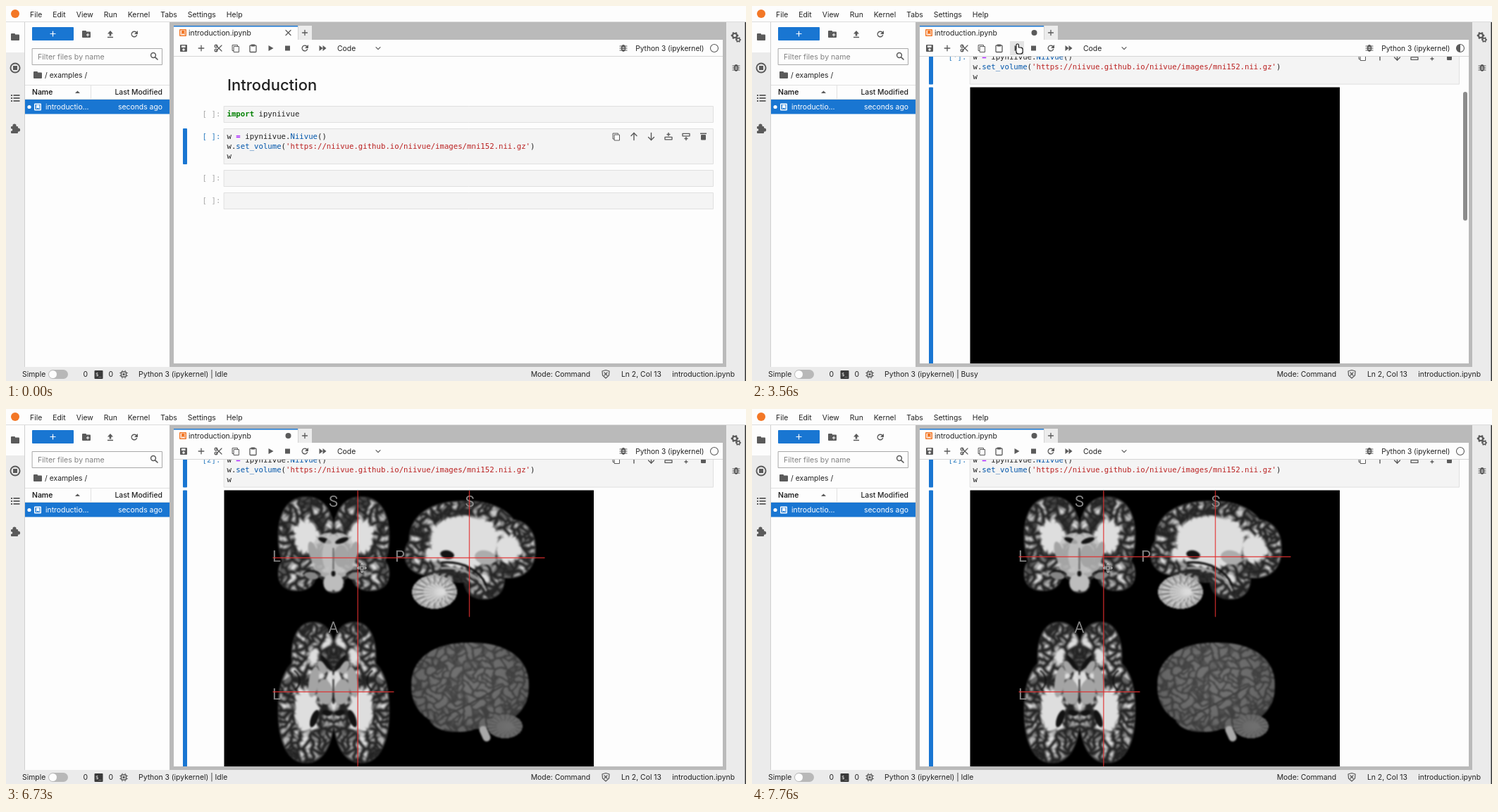
Recreate the animation shown at these times as an HTML page with a canvas. Size 1050 px wide and 533 px high, loop 8000 ms.

```html
<!DOCTYPE html>
<html lang="en">
<head>
<meta charset="utf-8">
<title>Notebook demo</title>
<style>
html, body { margin: 0; width: 100%; height: 100%; overflow: hidden; background: #fdfdfd; }
canvas { display: block; width: 1050px; height: 533px; }
</style>
</head>
<body>
<canvas id="stage" width="1050" height="533"></canvas>
<script>
const W = 1050, H = 533, LOOP = 8000, MID = 464.5;
const g = document.getElementById('stage').getContext('2d');
let c = g; // context the helpers draw on

const UI = '10.4px Inter, sans-serif', MONO = '10.68px "DejaVu Sans Mono", monospace';
const WHITE = '#fdfdfd', INK = '#222', ICON = '#5a5a5a', BLUE = '#1976d2', ORANGE = '#f37726';
const PANEL = '#ebebeb', RULE = '#e0e0e0', DARK = '#121212', GRAY = '#a4a4a4';

// ---- drawing helpers ----
function box(x, y, w, h, col, r = 0) {
  c.fillStyle = col; c.beginPath(); c.roundRect(x, y, w, h, r); c.fill();
}
function frame(x, y, w, h, col = ICON, r = 0, lw = 1) {
  c.strokeStyle = col; c.lineWidth = lw; c.beginPath(); c.roundRect(x, y, w, h, r); c.stroke();
}
function oval(x, y, rx, ry, col, rot = 0) {
  c.fillStyle = col; c.beginPath(); c.ellipse(x, y, rx, ry, rot, 0, 7); c.fill();
}
function arc(x, y, rx, ry, col, w, from = 0, to = 2 * Math.PI) {
  c.strokeStyle = col; c.lineWidth = w; c.lineCap = 'round';
  c.beginPath(); c.ellipse(x, y, rx, ry, 0, from, to); c.stroke();
}
const disc = (x, y, r, col) => oval(x, y, r, r, col);
const ring = (x, y, r, w = 1.2, from, to) => arc(x, y, r, r, ICON, w, from, to);
function trace(flat) {
  c.beginPath();
  for (let i = 0; i < flat.length; i += 2) c.lineTo(flat[i], flat[i + 1]);
}
function lines(col, w, ...polys) {
  c.strokeStyle = col; c.lineWidth = w; c.lineCap = c.lineJoin = 'round';
  for (const p of polys) { trace(p); c.stroke(); }
}
function shape(col, flat) { c.fillStyle = col; trace(flat); c.fill(); }
function text(s, x, y, col = INK, font = UI, align = 'left') {
  c.font = font; c.textAlign = align; c.fillStyle = col;
  c.fillText(s, x, y + 3.9);
  return c.measureText(s).width;
}
function code(x, y, ...parts) {
  for (const [s, col = INK, weight = ''] of parts) x += text(s, x, y, col, weight + MONO);
}

// ---- maths helpers ----
const clamp = v => Math.max(0, Math.min(1, v));
const ease = k => k * k * (3 - 2 * k);
const between = (t, a, b) => t >= a && t < b;
function rng(s) { return () => (s = s * 16807 % 2147483647) / 2147483647; }
function along(keys, t) {
  const i = keys.findIndex(k => t < k[0]);
  if (i < 0) return keys[keys.length - 1][1];
  if (!i) return keys[0][1];
  const [t0, a] = keys[i - 1], [t1, b] = keys[i];
  return a + (b - a) * (t - t0) / (t1 - t0);
}

// ---- brain tissue: unions of rounded lobes [x, y, rx, ry], creased by cell borders ----
function depth([cx, cy, rx, ry], x, y) {
  const q = (Math.abs((x - cx) / rx) ** 2.3 + Math.abs((y - cy) / ry) ** 2.3) ** (1 / 2.3);
  return (1 - q) * Math.min(rx, ry);
}
function deepest(lobes, x, y) {
  return lobes.reduce((a, b) => depth(b, x, y) > depth(a, x, y) ? b : a);
}
function bounds(lobes) {
  const lo = k => Math.min(...lobes.map(l => l[k] - l[k + 2])), hi = k => Math.max(...lobes.map(l => l[k] + l[k + 2]));
  return [lo(0), lo(1), hi(0), hi(1)].map(Math.round);
}
function gyri([x0, y0, x1, y1], pitch, seed, aim) {
  const rnd = rng(seed), list = [];
  for (let y = y0; y < y1 + pitch; y += pitch) for (let x = x0; x < x1 + pitch; x += pitch) {
    const sx = x + (rnd() - .5) * pitch * .9, sy = y + (rnd() - .5) * pitch * .9;
    const a = aim(sx, sy) + (rnd() - .5);
    list.push([-.45, 0, .45].map(d => [sx + d * pitch * Math.cos(a), sy + d * pitch * Math.sin(a)]));
  }
  return list;
}
function crease(list, x, y) {
  const px = x + 1.8 * Math.sin(y / 3.7), py = y + 1.8 * Math.sin(x / 4.1);
  let near = 1e9, next = 1e9;
  for (const cell of list) {
    let d = 1e9;
    for (const [sx, sy] of cell) d = Math.min(d, (px - sx) ** 2 + (py - sy) ** 2);
    if (d < near) { next = near; near = d; } else if (d < next) next = d;
  }
  return (Math.sqrt(next) - Math.sqrt(near)) / 2;
}
function paint([x0, y0, x1, y1], shade) {
  const w = x1 - x0 + 2, img = c.createImageData(w, y1 - y0 + 2);
  for (let i = 0; i < img.data.length; i += 4) {
    const x = x0 + i / 4 % w, y = y0 + Math.floor(i / 4 / w), [v, a] = shade(x, y);
    img.data.fill(v, i, i + 3);
    img.data[i + 3] = 255 * clamp(a);
  }
  c.putImageData(img, x0, y0);
}
// with mirror, lobes are given as distances from the midline
function slice(lobes, seed, mirror, reach = 22) {
  const b = bounds(lobes), aim = (x, y) => {
    const [cx, cy] = deepest(lobes, x, y);
    return Math.atan2(cy - y, cx - x);
  };
  const cells = gyri(b, 15, seed, aim);
  const area = mirror ? [Math.floor(MID - b[2]), b[1], Math.ceil(MID + b[2]), b[3]] : b;
  paint(area, (x, y) => {
    const u = mirror ? Math.abs(x - MID) : x, d = depth(deepest(lobes, u, y), u, y);
    if (d <= 0) return [0, 0];
    const e = Math.min(d, crease(cells, u, y) + Math.max(0, d - reach) * .8);
    return [34 + 188 * ease(clamp(e / 5.6)), d];
  });
}
function cerebellum(x, y, rx, ry, base, branch) {
  c.save();
  c.beginPath(); c.ellipse(x, y, rx, ry, 0, 0, 7); c.clip();
  box(x - rx, y - ry, 2 * rx, 2 * ry, base);
  for (let i = 0; i < 36; i++) {
    const a = i * Math.PI / 18, ex = x + rx * Math.cos(a), ey = y + ry * Math.sin(a);
    if (i % 2) lines('#4c4c4c', 1, [ex, ey, ex + (x - ex) * .5, ey + (y - ey) * .5]);
    else lines(branch, 1.6, [x + rx * .4, y, ex + (x - ex) * .2, ey + (y - ey) * .2]);
  }
  c.restore();
}
function twin(draw) {
  for (const s of [-1, 1]) { c.save(); c.translate(MID, 0); c.scale(s, 1); draw(); c.restore(); }
}
function layer(draw) {
  const a = new OffscreenCanvas(W, H), b = new OffscreenCanvas(W, H);
  c = a.getContext('2d'); draw(); c = g;
  const out = b.getContext('2d');
  out.filter = 'blur(0.8px)';
  out.drawImage(a, 0, 0);
  return b;
}

const coronal = layer(() => {
  slice([[39, 181, 41, 58], [52, 233, 28, 26], [0, 208, 34, 38], [0, 244, 16, 18]], 31, true);
  twin(() => {
    oval(8, 208, 24, 32, 'rgba(196,196,196,.8)');
    oval(29, 204, 6, 16, GRAY, .25);
    oval(11, 209, 10, 16, GRAY);
    oval(12, 187, 10, 3.6, DARK, -.35);
    oval(31, 237, 10, 5, '#858585', -.2);
    arc(31, 238, 13, 8, DARK, 2, 3.5, 5.8);
    oval(5, 247, 9, 12, '#bdbdbd');
  });
  lines('#444', 1.6, [MID, 198, MID, 228]);
  oval(MID, 234, 3, 4, DARK);
});

const axialHigh = layer(() => {
  slice([[29, 352, 32, 51], [39, 428, 41, 76], [0, 388, 36, 44]], 52, true);
  twin(() => {
    oval(28, 388, 7, 22, GRAY, -.15);
    oval(12, 402, 11, 18, GRAY, .15);
    oval(16, 367, 5, 10, GRAY, .5);
    oval(10, 361, 3.2, 13, DARK, .6);
    arc(62, 386, 14, 16, DARK, 2.2, 2.2, 4.2);
    oval(27, 440, 5, 13, DARK, -.35);
    oval(9, 432, 7, 4, DARK, -.2);
  });
  lines('#181818', 2, [MID, 372, MID, 418]);
  oval(MID, 381, 3, 3, '#d0d0d0');
});

const axialLow = layer(() => {
  slice([[29, 345, 32, 42], [48, 412, 32, 48], [34, 454, 36, 47], [0, 395, 32, 36]], 77, true);
  oval(MID, 449, 19, 30, DARK);
  twin(() => {
    oval(14, 375, 16, 12, '#959595');
    lines(DARK, 2.6, [0, 384, 18, 386, 34, 380, 56, 367]);
    oval(33, 411, 9, 6, '#808080', .4);
    oval(9, 407, 14, 17, '#bebebe', -.2);
  });
  oval(MID, 448, 15, 21, '#7c7c7c');
  for (let y = 432; y < 466; y += 6) arc(MID, y - 5, 14, 7, '#2a2a2a', 1.6, .3, 2.8);
});

const sagittalMid = layer(() => {
  oval(575, 197, 6, 20, '#3c3c3c', .2);
  for (let i = 0; i < 4; i++) arc(712, 214 + 8 * i, 30 - 3 * i, 10, '#2a2a2a', 3, .2, 1.9);
  arc(690, 246, 120, 120, '#131313', 4, 3.6, 4.5);
  oval(666, 212, 20, 13, '#2b2b2b');
  lines('#8a8a8a', 2, [583, 234, 617, 201]);
  arc(671, 211, 38, 25, '#d8d8d8', 8, 3.3, 6.2);
  arc(670, 214, 24, 9, '#6c6c6c', 2.5, 3.3, 6);
  cerebellum(608, 241, 20, 28, '#747474', '#a8a8a8');
  lines('#b0b0b0', 13, [650, 228, 643, 256, 627, 288]);
  oval(650, 250, 11, 15, '#c4c4c4', .2);
});

const sagittalNear = layer(() => {
  slice([[644, 184, 88, 61], [702, 196, 56, 47], [598, 206, 42, 31]], 93, false, 20);
  arc(671, 218, 42, 35, '#dedede', 11, 3.1, 6.3);
  oval(671, 214, 34, 25, '#c8c8c8');
  oval(664, 213, 24, 17, GRAY);
  oval(697, 210, 8, 15, '#acacac', -.4);
  arc(671, 217, 38, 31, DARK, 4.5, 3.4, 6.3);
  lines(DARK, 3, [618, 232, 645, 232, 668, 242]);
  cerebellum(612, 260, 40, 26, '#9c9c9c', '#cacaca');
  oval(637, 254, 15, 8, '#cfcfcf');
});

const sagittalFar = layer(() => {
  slice([[650, 188, 80, 59], [712, 198, 40, 43], [606, 206, 42, 32], [678, 240, 30, 31]], 68, false, 20);
  oval(680, 211, 15, 10, '#acacac', .2);
  oval(626, 207, 10, 6, DARK, .2);
  for (const [d, col] of [[0, DARK], [8, '#9a9a9a'], [14, '#2a2a2a']]) arc(625, 262 + d, 58, 44, col, 3.2, 4.6, 6);
  cerebellum(608, 260, 32, 24, '#b0b0b0', '#dcdcdc');
});

const surface = layer(() => {
  const hull = [[658, 393, 84, 62], [640, 432, 42, 27]], rnd = rng(11);
  const cells = gyri(bounds(hull), 14, 7, () => rnd() * 6.3);
  paint(bounds(hull), (x, y) => {
    const light = 1.03 - .16 * ((x - 655) / 84) ** 2 - .1 * ((y - 385) / 65) ** 2;
    return [(66 + 44 * ease(clamp(crease(cells, x, y) / 2.4))) * light, depth(deepest(hull, x, y), x, y)];
  });
  lines('#3c3c3c', 2, [624, 436, 660, 418, 704, 394]);
  lines('#a8a8a8', 11, [677, 456, 682, 467]);
  cerebellum(708, 451, 25, 17, '#666', '#707070');
});

// ---- icons ----
function folder(x, y) { box(x - 6, y - 5, 6, 4, ICON, 1); box(x - 6, y - 3.5, 12, 8.5, ICON, 1); }
function plus(x, y, r, col = ICON, w = 1.3) { lines(col, w, [x - r, y, x + r, y], [x, y - r, x, y + r]); }
function times(x, y, r) { lines(ICON, 1.2, [x - r, y - r, x + r, y + r], [x - r, y + r, x + r, y - r]); }
function arrow(x, y, s) { lines(ICON, 1.4, [x, y - 5 * s, x, y + 5 * s], [x - 4, y + s, x, y + 5 * s, x + 4, y + s]); }
function play(x, y, w) { shape(ICON, [x, y - 4, x + w, y, x, y + 4]); }
function redo(x, y) { ring(x, y, 3.8, 1.4, .4, 5.6); shape(ICON, [x + 5, y - 5, x + 5, y, x, y]); }
function bug(x, y) {
  for (const d of [-3, 0, 3]) lines(ICON, 1.2, [x - 5, y + d, x + 5, y + d]);
  oval(x, y, 3.3, 5, ICON);
  for (const d of [-1, 1.5]) lines(WHITE, 1, [x - 1.2, y + d, x + 1.2, y + d]);
}
function gear(x, y, r) {
  for (let a = 0; a < 6; a++) disc(x + r * Math.cos(a * 1.047), y + r * Math.sin(a * 1.047), r * .35, ICON);
  ring(x, y, r * .75, r * .5);
}
function book(x, y, col, inner) {
  box(x - 5, y - 5, 10, 10, col, 1); box(x - 3.5, y - 3.5, 7, 7, inner);
  shape(col, [x - 2, y - 3, x + 2.5, y - 3, x + 2.5, y + 3, x, y + 1, x - 2, y + 3]);
}
function sheets(x, y) {
  frame(x - 4.5, y - 4.5, 7, 8); box(x - 3, y - 3, 8, 9, WHITE); frame(x - 2.5, y - 2.5, 7, 8);
}
function insert(x, y, s) { frame(x - 5, y + 2.5 * s - 1.7, 10, 3.5, ICON, 0, 1.3); plus(x, y - 3 * s, 2); }
function cellTools(y) {
  sheets(866, y); arrow(891, y, -1); arrow(915.5, y, 1); insert(940, y, 1); insert(965, y, -1);
  box(986, y - 2.5, 7, 7.5, ICON, 1); box(985, y - 5, 9, 1.6, ICON);
}

// ---- page parts ----
function sideBars() {
  box(0, 66, 27, 447, PANEL); box(26, 23, 1, 490, '#d0d0d0');
  box(1022, 23, 28, 490, PANEL);
  folder(13, 44);
  disc(13, 88, 7.5, ICON); disc(13, 88, 5.6, PANEL); box(10, 85, 6, 6, ICON);
  for (const y of [127, 131, 135]) { box(7, y - 1, 2, 2, ICON); box(10.5, y - 1, 9, 1.8, ICON); }
  box(7, 171, 10, 10, ICON, 1); disc(12, 170, 2.6, ICON); disc(17.5, 176, 2.6, ICON); disc(7.5, 176, 1.8, PANEL);
  gear(1034, 42, 4); gear(1039, 48, 3); bug(1036, 88);
}
function filePanel() {
  box(37, 30, 59, 19, BLUE, 1); plus(66.5, 39.5, 3.5, '#fff', 1.2);
  folder(114, 40); plus(116, 41, 2, WHITE, 1);
  shape(ICON, [148, 35, 152, 39.5, 144, 39.5]); box(146.7, 39, 2.6, 3.5, ICON); box(144, 43.7, 8, 1.5, ICON);
  redo(182, 40);
  frame(37.5, 60.5, 184, 23, '#a9a9a9');
  text('Filter files by name', 45, 72, '#808080', '10.6px Inter, sans-serif');
  ring(209, 70, 3.4, 1.5); lines(ICON, 1.7, [211.6, 72.8, 215, 76]);
  folder(45, 98); text('/ examples /', 55, 98);
  for (const y of [112, 132]) box(27, y, 205, 1, RULE);
  box(120, 113, 1, 19, RULE);
  text('Name', 37, 122.5, INK, '600 ' + UI);
  shape(ICON, [98, 124, 101.5, 120.5, 105, 124]);
  text('Last Modified', 222, 122.5, INK, '500 ' + UI, 'right');
  box(27, 133, 205, 20.5, BLUE);
  disc(33, 143.5, 2.6, '#fff'); book(45, 143.5, '#fff', BLUE);
  text('introductio…', 56, 143.5, '#fff'); text('seconds ago', 222, 143.5, '#fff', UI, 'right');
}
function dock(s) {
  box(232, 23, 790, 490, '#bababa');
  box(238, 28, 176, 21, WHITE); box(238, 28, 176, 1.6, BLUE);
  box(414.5, 28, 19.5, 20, '#ececec'); plus(424, 38, 3.5);
  box(238, 48, 779, 460, WHITE); box(238, 71, 779, 1, '#d6d6d6');
  book(251, 38, ORANGE, WHITE); text('introduction.ipynb', 259, 38.5);
  if (s.dirty) disc(400.5, 38, 4, ICON); else times(400.5, 38, 3.5);

  if (s.hover) box(366, 50, 20, 20, '#e4e4e4');
  box(247, 55, 10, 10, ICON, 1); box(249, 56.3, 5.5, 2.6, WHITE); disc(252, 62, 1.7, WHITE);
  plus(277, 60, 3.8);
  times(302, 60, 4); ring(298, 57, 1.9); ring(298, 63, 1.9);
  sheets(326, 60);
  frame(346, 56, 9, 9.5, ICON, 1, 1.3); box(348, 54.5, 5, 3, ICON);
  play(372.5, 60, 7); box(396, 56.5, 7, 7, ICON); redo(424, 60);
  play(444.5, 60, 5); play(449.5, 60, 5);
  text('Code', 470, 60); lines(ICON, 1.2, [525, 58.7, 528, 61.7, 531, 58.7]);
  bug(876, 60); text('Python 3 (ipykernel)', 990.5, 60, INK, '10.2px Inter, sans-serif', 'right');
  ring(1005, 60, 5.5, 1.1);
  if (s.busy) { c.fillStyle = ICON; c.beginPath(); c.arc(1005, 60, 5.5, Math.PI / 2, Math.PI * 1.5); c.fill(); }
}
function statusBar(s) {
  const y = 523.5;
  box(0, 513, W, 20, PANEL);
  text('Simple', 23, y);
  box(60, 517, 28, 13, '#b8b8b8', 6.5); disc(66.5, y, 5.5, WHITE);
  text('0', 109.5, y); text('0', 145.5, y);
  box(125.5, 518, 12, 12, '#3a3a3a', 1); text('$_', 127, 522.5, '#fff', '7px "DejaVu Sans Mono", monospace');
  for (const d of [-2, 2]) lines(ICON, 1, [167 + d, 518, 167 + d, 529], [161.5, y + d, 172.5, y + d]);
  box(163, 519.5, 8, 8, PANEL); frame(163.5, 520, 7, 7, ICON, 1, 1.6); box(165.5, 522, 3, 3, ICON);
  text('Python 3 (ipykernel) | ' + (s.busy ? 'Busy' : 'Idle'), 188, y);
  text(s.edit ? 'Mode: Edit' : 'Mode: Command', 829, y, INK, UI, 'right');
  lines(ICON, 1.2, [851, 517.5, 856, 519, 855.5, 525, 851, 529, 846.5, 525, 846, 519, 851, 517.5]); times(851, 523, 2);
  text(s.edit ? 'Ln 1, Col 17' : 'Ln 2, Col 13', 930, y, INK, UI, 'right');
  text('introduction.ipynb', 1034, y, INK, UI, 'right');
}
function chrome(s) {
  box(0, 0, W, H, WHITE);
  box(0, 22, W, 1, '#dcdcdc');
  disc(13, 11, 6, ORANGE);
  let x = 34;
  for (const name of ['File', 'Edit', 'View', 'Run', 'Kernel', 'Tabs', 'Settings', 'Help']) x += text(name, x, 12.4) + 15;
  sideBars(); filePanel(); dock(s); statusBar(s);
  box(1048.5, 23, 1.5, 510, '#333');
}

function cell(y, h, label, active, editing) {
  box(309, y, 695, h, editing ? WHITE : '#f4f4f4');
  frame(309.5, y + .5, 694, h - 1, editing ? BLUE : RULE);
  code(278.6, y + 11.5, [`[${label}]:`, active ? '#307fc1' : '#a8a8a8']);
  if (active) { box(251, y, 6, h, BLUE, 1); cellTools(y + 11.5); }
}
function notebook(s) {
  c.save();
  c.beginPath(); c.rect(238, 72, 779, 436); c.clip();
  c.translate(0, s.output ? -113.5 : 0);
  text('Introduction', 314, 116.5, INK, '500 22px Inter, sans-serif');
  cell(142, 24, s.run1, s.edit, s.edit);
  code(313.5, 153.5, ['import', '#008000', 'bold '], [' ipyniivue']);
  cell(174, 51, s.run2, !s.edit);
  code(313.5, 185.5, ['w '], ['=', '#aa22ff', 'bold '], [' ipyniivue.'], ['Niivue', '#0055aa'], ['()']);
  code(313.5, 199.5, ['w.'], ['set_volume', '#0055aa'], ['('], ["'https://niivue.github.io/niivue/images/mni152.nii.gz'", '#ba2121'], [')']);
  code(313.5, 213.5, ['w']);
  if (s.output) {
    box(251, 229, 6, 400, BLUE, 1);
    box(309.5, 229, 524.5, 400, '#000');
  } else for (const y of [233, 265]) cell(y, 24, ' ');
  c.restore();
  c.globalAlpha = s.bar;
  box(1009, 122, 6, 183, '#8c8c8c', 3);
  c.globalAlpha = 1;
}

// the crosshair is dragged round an ellipse
function crosshair(t) {
  if (t < 6210) return [MID, 206];
  const a = along([[6600, 25], [6730, -8], [7100, -212], [7760, -372]], t) * Math.PI / 180;
  return [470.5 + 29 * Math.cos(a), 215 + 24 * Math.sin(a)];
}
function fade(img, k = 1) { c.globalAlpha = k; c.drawImage(img, 0, 0); c.globalAlpha = 1; }
function viewer(t) {
  const [x, y] = crosshair(t), off = Math.abs(x - MID);
  const low = clamp((y - 214) / 12), near = clamp((off - 4) / 10), far = clamp((off - 20) / 10);
  c.save();
  c.beginPath(); c.rect(310, 116, 524, 392); c.clip();
  fade(coronal); fade(surface);
  fade(axialHigh, 1 - low); fade(axialLow, low);
  fade(sagittalMid, 1 - near); fade(sagittalNear, near * (1 - far)); fade(sagittalFar, far);
  const labels = [['S', MID, 135], ['S', 658, 135], ['L', 384, 213], ['P', 559, 213], ['A', MID, 314], ['L', 384, 409]];
  for (const l of labels) text(...l, 'rgba(150,150,150,.85)', '22px Roboto, sans-serif', 'center');
  lines('rgba(226,48,48,.8)', 1.4, [x, 116, x, 508], [379, y, 764, y], [379, 402, 550, 402], [657.5, 116, 657.5, 295]);
  c.restore();
}

// each move: start, end, goal
const MOVES = [[1180, 1370, 480, 144], [1580, 1880, 480, 153], [2120, 2600, 378, 60], [4700, 5250, 608, 262], [5710, 5950, 505, 226]];
function pointer(t, output) {
  if (t < MOVES[0][0]) return;
  let x = 520, y = 300;
  for (const [from, to, gx, gy] of MOVES) {
    const k = ease(clamp((t - from) / (to - from)));
    x += (gx - x) * k; y += (gy - y) * k;
  }
  c.save(); c.translate(x, y);
  if (y < 72) {
    for (const [col, d] of [['#111', .6], ['#fff', -.5]]) {
      box(-3 - d, -6 - d, 3.4 + 2 * d, 11 + 2 * d, col, 2);
      box(-3 - d, -1 - d, 9 + 2 * d, 9 + 2 * d, col, 3);
    }
  } else if (output && y > 116) {
    plus(0, 0, 5, '#eee', 3); plus(0, 0, 5, '#111', 1.1);
  } else if (y > 290 || y < 142) {
    const tip = [0, 0, 0, 12, 3, 9.5, 5, 14, 7, 13, 5, 9, 9, 9, 0, 0];
    shape('#111', tip); lines('#fff', .8, tip);
  } else {
    lines('#222', 1.1, [0, -5, 0, 5], [-2.5, -6, 0, -5, 2.5, -6], [-2.5, 6, 0, 5, 2.5, 6]);
  }
  c.restore();
}

function draw(t) {
  const run = (from, to, n) => t < from ? ' ' : t < to ? '*' : n;
  const s = {
    output: t >= 3500,
    edit: between(t, 1800, 2700),
    dirty: t >= 2700,
    busy: between(t, 2700, 2780) || between(t, 3450, 4200),
    hover: between(t, 2560, 4800),
    bar: t < 3500 ? 0 : 1 - clamp((t - 4070) / 250),
    run1: run(2700, 2780, '1'),
    run2: run(3450, 4200, '2')
  };
  chrome(s);
  notebook(s);
  if (t >= 4700) viewer(t);
  pointer(t, s.output);
}

const start = performance.now();
function tick(now) {
  draw(Math.max(0, now - start) % LOOP);
  requestAnimationFrame(tick);
}
draw(0);
requestAnimationFrame(tick);
</script>
</body>
</html>
```
